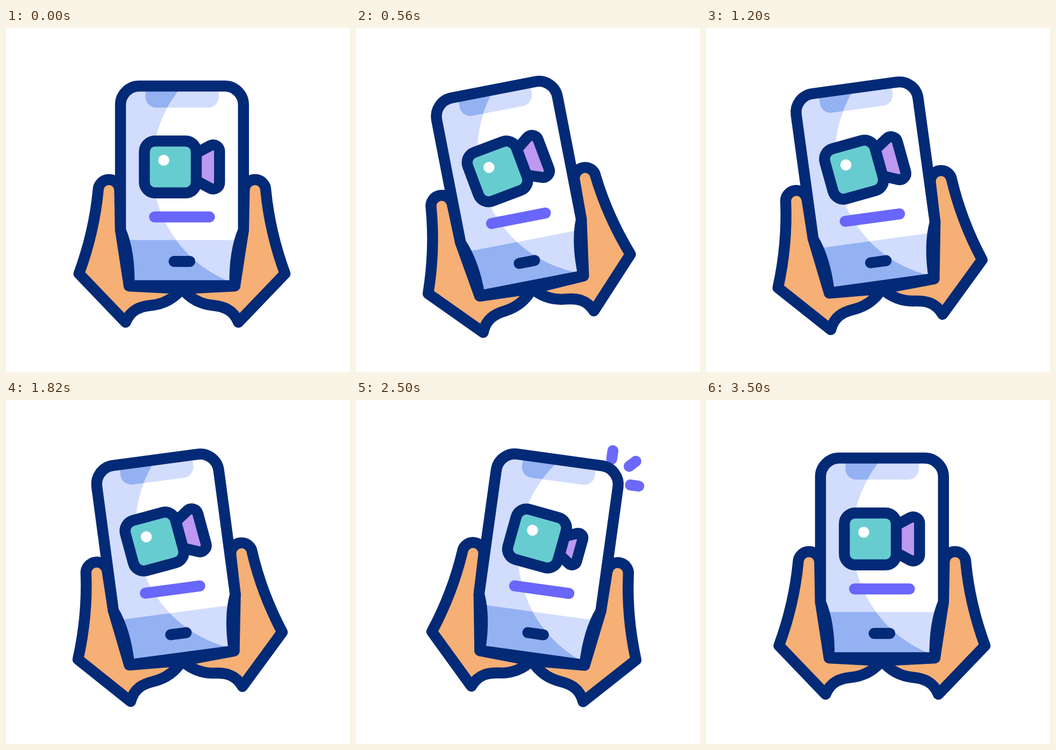
These frames come from a looping animation (640x640 px, 3620 ms). An HTML page with a canvas:

```html
<!DOCTYPE html>
<html lang="en">
<head>
<meta charset="utf-8">
<title>Video call in hands</title>
<style>
  html, body { margin: 0; width: 100%; height: 100%; overflow: hidden; background: #fff; }
  canvas { display: block; width: 640px; height: 640px; }
</style>
</head>
<body>
<canvas id="stage" width="640" height="640"></canvas>
<script>
const ctx = document.getElementById('stage').getContext('2d');
const LOOP = 3620;
const LINE = 20.4;
const AXIS = 327.4;
const PIVOT_Y = 483.5;
const CAMERA = { x: 305.7, y: 258.5 };
const COLOR = {
  navy: '#032a76', skin: '#f6af74', light: '#d2dcfd', mid: '#94b1f2',
  teal: '#67ccd0', lilac: '#bd98f0', violet: '#6966fa', white: '#fff'
};

// Keyframes as [time, value]
const TILT = [[200, 0], [670, -12.6], [946, -7.8], [1800, -7.8], [2130, 12.35],
              [2500, 7.9], [3100, 7.9], [3500, 0]];
const CAMERA_TILT = [[200, 0], [600, -9.8], [950, -7.7], [1800, -7.7], [2150, 8],
                     [2500, 7.7], [3100, 7.7], [3500, 0]];
const LENS = [[720, 1], [910, 0.72], [1120, 1]];
const SPARK_TIP = [[780, 43], [980, 74]];
const SPARK_TAIL = [[880, 43], [1200, 74]];
const SPARK_ALPHA = [[800, 0], [890, 1], [1040, 1], [1190, 0]];
const REPEAT_DELAY = 1620;

const smooth = p => (1 - Math.cos(Math.PI * p)) / 2;

function track(keys, t) {
  if (t <= keys[0][0]) return keys[0][1];
  for (let i = 1; i < keys.length; i++) {
    const [t0, a] = keys[i - 1], [t1, b] = keys[i];
    if (t < t1) return a + (b - a) * smooth((t - t0) / (t1 - t0));
  }
  return keys[keys.length - 1][1];
}

function rotateAt(x, y, degrees) {
  ctx.translate(x, y);
  ctx.rotate(degrees * Math.PI / 180);
  ctx.translate(-x, -y);
}

function paint(path, fill) {
  if (fill) {
    ctx.fillStyle = fill;
    ctx.fill(path);
  }
  ctx.strokeStyle = COLOR.navy;
  ctx.stroke(path);
}

function line(x0, y0, x1, y1, color) {
  ctx.strokeStyle = color;
  ctx.beginPath();
  ctx.moveTo(x0, y0);
  ctx.lineTo(x1, y1);
  ctx.stroke();
}

const hand = new Path2D(
  'M229 480 L213 376 L211.5 302 A20 20 0 0 0 171.5 302 Q164 380 135.7 457 ' +
  'L222.5 547.5 C232 524 250 518 270 516 S310 506 327.4 485 Z');

const phone = new Path2D(
  'M229 479.5 C230 430 222 397 213 376 V143 A35 35 0 0 1 248 108 ' +
  'H406.8 A35 35 0 0 1 441.8 143 V376 C432.8 397 424.8 430 425.8 479.5 Z');

const panels = new Path2D('M203 394.5 H452 V490 H203 Z');
const notch = new Path2D('M259.5 100 H396 V128 A20 20 0 0 1 376 148 H279.5 A20 20 0 0 1 259.5 128 Z');
panels.addPath(notch);

const glow = new Path2D();
glow.arc(501.5, 258.5, 229.5, 0, 7);

const cameraBody = new Path2D();
cameraBody.roundRect(257.4, 210.2, 96.6, 96.6, 20);

function drawHands() {
  for (const side of [1, -1]) {
    ctx.save();
    ctx.translate(AXIS, 0);
    ctx.scale(side, 1);
    ctx.translate(-AXIS, 0);
    paint(hand, COLOR.skin);
    ctx.restore();
  }
}

function drawScreen(base, panel) {
  ctx.fillStyle = base;
  ctx.fillRect(200, 95, 255, 395);
  ctx.fillStyle = panel;
  ctx.fill(panels);
}

function drawPhone() {
  ctx.save();
  ctx.clip(phone);
  drawScreen(COLOR.light, COLOR.mid);
  ctx.clip(glow);
  drawScreen(COLOR.white, COLOR.light);
  ctx.restore();
  paint(phone);
  line(276.3, 351.5, 378.5, 351.5, COLOR.violet);
  line(312.7, 434.3, 342, 434.3, COLOR.navy);
}

function lensPath(scale) {
  const px = x => 362 + (x - 362) * scale;
  const py = y => CAMERA.y + y * scale;
  const path = new Path2D();
  path.moveTo(px(348), py(0));
  path.lineTo(px(348), py(-22.5));
  path.arcTo(px(397.3), py(-49), px(397.3), py(0), 12 * scale);
  path.arcTo(px(397.3), py(49), px(348), py(22.5), 12 * scale);
  path.lineTo(px(348), py(22.5));
  path.closePath();
  return path;
}

function drawCamera(tilt, lensScale) {
  ctx.save();
  rotateAt(CAMERA.x, CAMERA.y, tilt);
  paint(lensPath(lensScale), COLOR.lilac);
  paint(cameraBody, COLOR.teal);
  ctx.fillStyle = COLOR.white;
  ctx.beginPath();
  ctx.arc(293.5, 246, 10.3, 0, 7);
  ctx.fill();
  ctx.restore();
}

function drawSparks(t) {
  const alpha = track(SPARK_ALPHA, t);
  if (alpha <= 0) return;
  const tip = track(SPARK_TIP, t), tail = track(SPARK_TAIL, t);
  ctx.save();
  ctx.globalAlpha = alpha;
  for (const [angle, extra] of [[0, 0], [45, 5], [90, -2]]) {
    const a = angle * Math.PI / 180, dx = Math.sin(a), dy = -Math.cos(a);
    const near = tail + extra, far = tip + extra;
    line(423 + dx * near, 136 + dy * near, 423 + dx * far, 136 + dy * far, COLOR.violet);
  }
  ctx.restore();
}

function draw(t) {
  const pulse = t < 1500 ? t : t - REPEAT_DELAY;
  ctx.fillStyle = COLOR.white;
  ctx.fillRect(0, 0, 640, 640);
  ctx.lineWidth = LINE;
  ctx.lineCap = ctx.lineJoin = 'round';
  ctx.save();
  rotateAt(AXIS, PIVOT_Y, track(TILT, t));
  drawSparks(pulse);
  drawHands();
  drawPhone();
  drawCamera(track(CAMERA_TILT, t), track(LENS, pulse));
  ctx.restore();
}

const start = performance.now();
function tick() {
  draw((performance.now() - start) % LOOP);
  requestAnimationFrame(tick);
}
tick();
</script>
</body>
</html>
```
